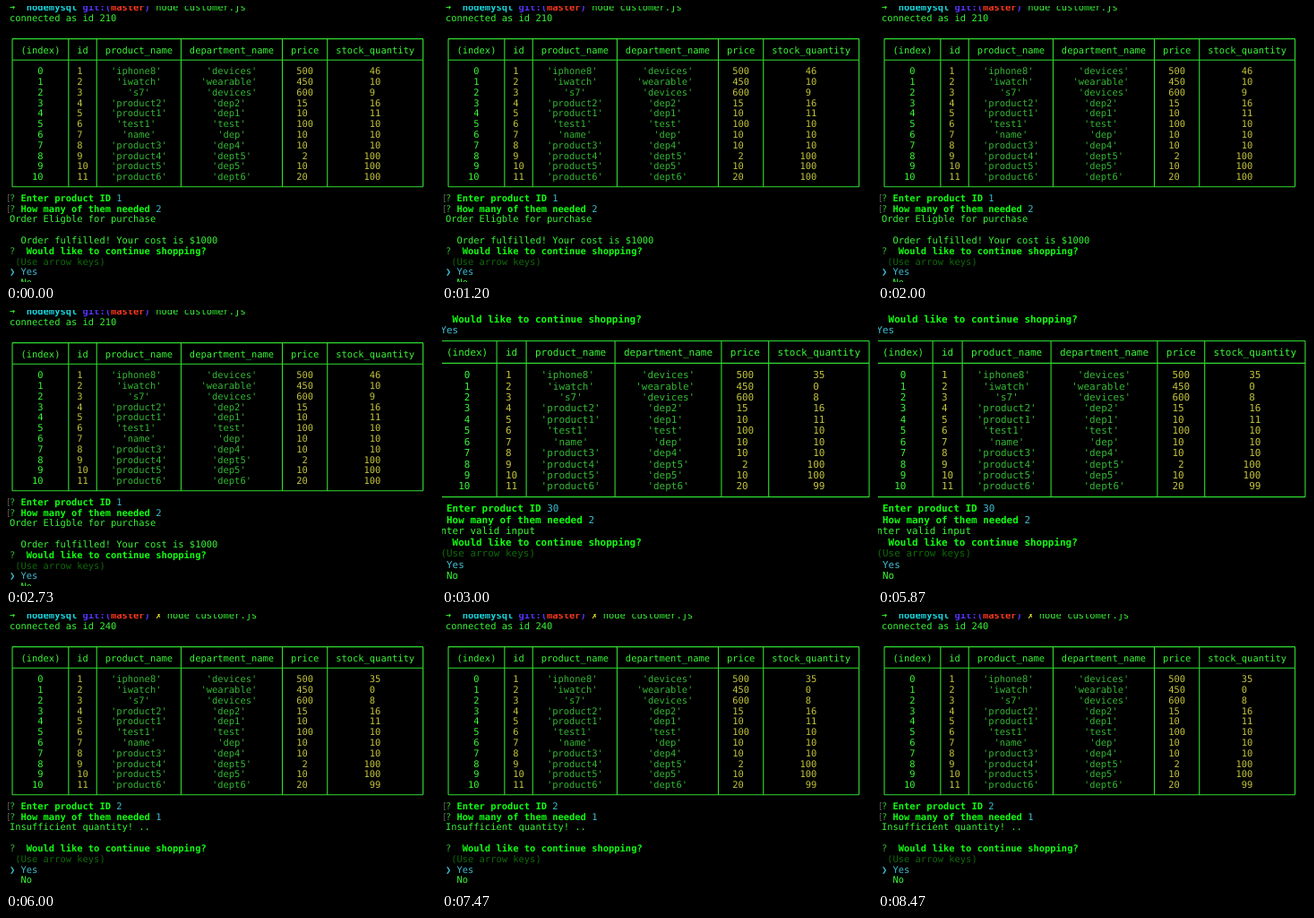
Animation, 480 px wide and 308 px high, one loop 8990 ms. Source, as an HTML page with a canvas:

```html
<!DOCTYPE html>
<html lang="en">
<head>
<meta charset="utf-8">
<title>Terminal store session</title>
<style>
html, body { margin: 0; width: 100%; height: 100%; overflow: hidden; background: #000; }
canvas { display: block; }
</style>
</head>
<body>
<canvas id="stage" width="480" height="308"></canvas>
<script>
const LOOP = 8990;
const COLOR = {
  text: '#38f636', bold: '#10ff10', string: '#34b834', number: '#c4c43c',
  cyan: '#3fbcd0', hint: '#0e6a08', mark: '#4a4a4a', rule: '#30dc30'
};
const ctx = document.getElementById('stage').getContext('2d');
ctx.textRendering = 'geometricPrecision';

const HEADERS = ['(index)', 'id', 'product_name', 'department_name', 'price', 'stock_quantity'];
const PRODUCTS = [
  ['iphone8', 'devices', 500], ['iwatch', 'wearable', 450], ['s7', 'devices', 600],
  ['product2', 'dep2', 15], ['product1', 'dep1', 10], ['test1', 'test', 100],
  ['name', 'dep', 10], ['product3', 'dep4', 10], ['product4', 'dept5', 2],
  ['product5', 'dep5', 10], ['product6', 'dept6', 20]
];
const STOCK_BEFORE = [46, 10, 9, 16, 11, 10, 10, 10, 100, 100, 100];
const STOCK_AFTER = [35, 0, 8, 16, 11, 10, 10, 10, 100, 100, 99];

// Terminal views: origin of the text grid, cell width and line height
const NORMAL = { x: 3.9, y: 1.6, cell: 6.28, line: 11.8 };
const ZOOMED = { x: -8.2, y: 10, cell: 6.6, line: 12.44 };
let view = NORMAL;

const colX = col => view.x + col * view.cell;
const rowY = row => view.y + row * view.line;

function write(row, col, text, color = COLOR.text, bold = false) {
  ctx.font = `${bold ? 'bold ' : ''}${view.cell / 0.602}px "DejaVu Sans Mono", monospace`;
  ctx.fillStyle = color;
  const baseline = rowY(row) + view.cell * 0.59;
  [...String(text)].forEach((ch, i) => {
    if (ch !== ' ') ctx.fillText(ch, colX(col + i), baseline);
  });
}

function drawTable(top, stock) {
  const edges = [0];
  HEADERS.forEach(h => edges.push(edges.at(-1) + h.length + 3));
  const bottom = top + PRODUCTS.length + 3;
  const lineX = edge => colX(edge + 0.5);
  const lineY = row => rowY(row) - 0.4;

  ctx.strokeStyle = COLOR.rule;
  ctx.lineWidth = 1.1;
  ctx.beginPath();
  for (const edge of edges) {
    ctx.moveTo(lineX(edge), lineY(top));
    ctx.lineTo(lineX(edge), lineY(bottom));
  }
  for (const row of [top, top + 2, bottom]) {
    ctx.moveTo(lineX(0), lineY(row));
    ctx.lineTo(lineX(edges.at(-1)), lineY(row));
  }
  ctx.stroke();

  const center = (row, column, value, color) => {
    const text = String(value);
    const pad = Math.floor((HEADERS[column].length + 2 - text.length) / 2);
    write(row, edges[column] + 1 + pad, text, color);
  };
  HEADERS.forEach((h, c) => center(top + 1, c, h, COLOR.text));
  PRODUCTS.forEach(([name, department, price], i) => {
    const row = top + 3 + i;
    center(row, 0, i, COLOR.text);
    center(row, 1, i + 1, COLOR.number);
    center(row, 2, `'${name}'`, COLOR.string);
    center(row, 3, `'${department}'`, COLOR.string);
    center(row, 4, price, COLOR.number);
    center(row, 5, stock[i], COLOR.number);
  });
}

function drawMark(row) {
  const y = Math.round(rowY(row)) - 4;
  ctx.fillStyle = COLOR.mark;
  ctx.fillRect(2, y, 1, 9);
  ctx.fillRect(2, y, 2, 1);
  ctx.fillRect(2, y + 8, 2, 1);
}

function ask(row, question, answer) {
  write(row, 0, '?', COLOR.string);
  write(row, 2, question, COLOR.bold, true);
  if (answer) write(row, question.length + 3, answer, COLOR.cyan);
}

function askProduct(row, id, amount) {
  ask(row, 'Enter product ID', id);
  ask(row + 1, 'How many of them needed', amount);
}

const askContinue = row => ask(row, ' Would like to continue shopping?');

function askChoice(row) {
  askContinue(row);
  write(row + 1, 1, '(Use arrow keys)', COLOR.hint);
  write(row + 2, 0, '❯', COLOR.cyan, true);
  write(row + 2, 2, 'Yes', COLOR.cyan);
  write(row + 3, 2, 'No');
}

function startSession({ connection, stock, id, amount, dirty }) {
  view = NORMAL;
  write(0, 0, '➜', '#31e722', true);
  write(0, 3, 'nodemysql', '#14d8e0', true);
  write(0, 13, 'git:(', '#5833ff', true);
  write(0, 18, 'master', '#fc391f', true);
  write(0, 24, ')', '#5833ff', true);
  if (dirty) write(0, 26, '✗', '#eaec23', true);
  write(0, dirty ? 28 : 26, 'node customer.js');
  write(1, 0, `connected as id ${connection}`);
  drawTable(3, stock);
  askProduct(18, id, amount);
  drawMark(18);
  drawMark(19);
}

function orderFulfilled() {
  startSession({ connection: 210, stock: STOCK_BEFORE, id: '1', amount: '2', dirty: false });
  write(20, 0, 'Order Eligble for purchase');
  write(22, 2, 'Order fulfilled! Your cost is $1000');
  askChoice(23);
}

function invalidInput() {
  view = ZOOMED;
  askContinue(0);
  write(1, 1, 'Yes', COLOR.cyan);
  drawTable(2, STOCK_AFTER);
  askProduct(17, '30', '2');
  write(19, 0, 'Enter valid input');
  askChoice(20);
}

function insufficientQuantity() {
  startSession({ connection: 240, stock: STOCK_AFTER, id: '2', amount: '1', dirty: true });
  write(20, 0, 'Insufficient quantity! ..');
  askChoice(22);
}

let shown = null;
function render() {
  const t = performance.now() % LOOP;
  const screen = t < 3000 ? orderFulfilled : t < 6000 ? invalidInput : insufficientQuantity;
  if (screen !== shown) {
    ctx.fillStyle = '#000';
    ctx.fillRect(0, 0, 480, 308);
    screen();
    shown = screen;
  }
  requestAnimationFrame(render);
}
render();
</script>
</body>
</html>
```
